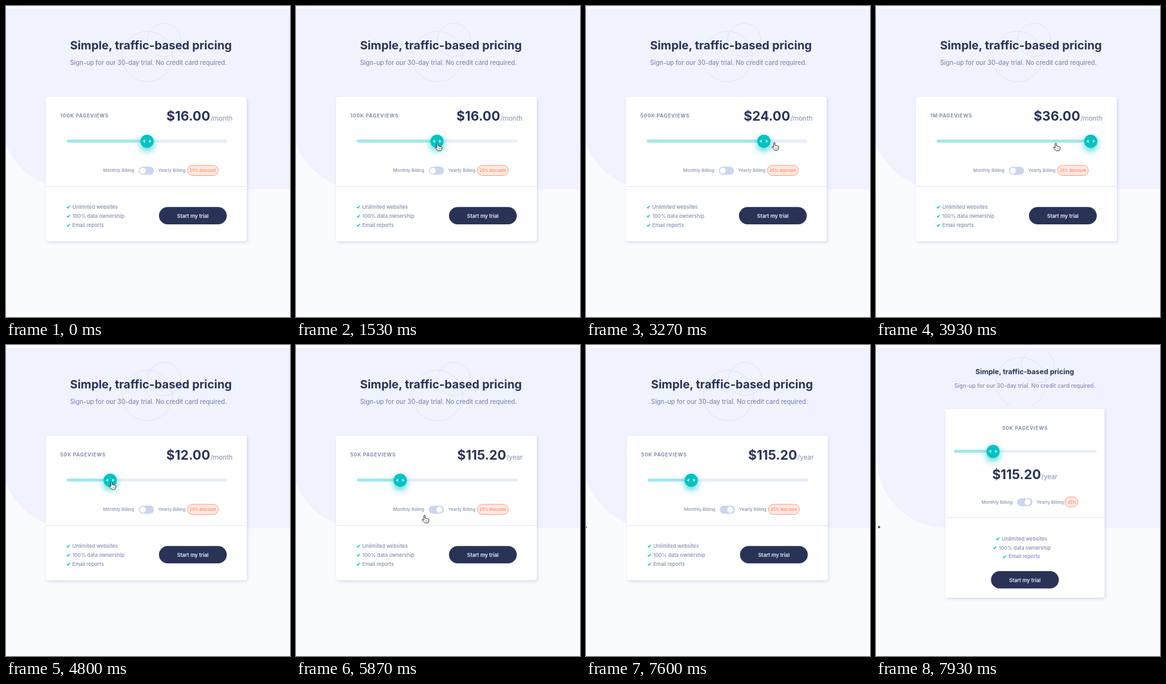
Write an HTML page that moves like this. It is 440 by 480 pixels and loops after 8000 ms.

```html
<!DOCTYPE html>
<html lang="en">
<head>
<meta charset="utf-8">
<title>Pricing slider</title>
<style>
  html, body { margin: 0; width: 100%; height: 100%; overflow: hidden; background: #fafbff; }
  svg { display: block; width: 440px; height: 480px; }
  text { font-family: Inter, sans-serif; }
</style>
</head>
<body>
<svg id="stage" viewBox="0 0 440 480"></svg>
<script>
const LOOP = 8000, FRAME = 1000 / 15;
const NAVY = '#293356', CYAN = '#00c2c3', ORANGE = '#ff8c66';
const TIERS = [['10K', 8], ['50K', 12], ['100K', 16], ['500K', 24], ['1M', 36]];
const FEATURES = ['Unlimited websites', '100% data ownership', 'Email reports'];
const YEARLY_AT = 5600, MOBILE_AT = 7660;

// Slider tier from each time on: [ms, tier]
const TIER_STEPS = [[0, 2], [2730, 3], [3530, 4], [4065, 3], [4260, 2], [4460, 1]];

// Pointer path: [ms, x, y] of the pointer's top left corner
const POINTER = [
  [395, 322, 474], [700, 276, 360], [1200, 216, 227], [1530, 215, 211], [1660, 215, 211],
  [1800, 214, 205], [1930, 215, 211], [2060, 215, 211], [2400, 228, 211], [2670, 250, 211],
  [2870, 276, 211], [3000, 278, 209], [3190, 278, 210], [3600, 328, 211], [3750, 326, 211],
  [3930, 275, 211], [4260, 192, 211], [4530, 158, 210], [4795, 158, 210], [5130, 236, 246],
  [5330, 213, 257], [5660, 213, 257], [5870, 194.5, 262.3], [6130, 90, 274], [6330, 10, 279],
  [6400, 3, 280]
];

const DESKTOP = {
  title: { x: 99.2, y: 67, size: 17.95 }, sub: { x: 99.3, y: 91.3, size: 9.72 },
  circles: [219, 78], clip: [0, 130], card: [62, 140, 311, 223],
  label: { x: 84, y: 172 }, price: { x: 351, y: 177, anchor: 'end' },
  track: [94, 343, 208.5], billing: [150.5, 254], badge: [281, 48, '25% discount'],
  divider: 278.5, features: [[94, 310], [94, 324], [94, 338]], button: [237, 310.3]
};
const MOBILE = {
  title: { x: 230.5, y: 45, size: 10.95, anchor: 'middle' },
  sub: { x: 230.5, y: 66, size: 8.76, anchor: 'middle' },
  circles: [224.5, 58], clip: [11, 83], card: [107.5, 99, 246.5, 291],
  label: { x: 231, y: 131, anchor: 'middle' }, price: { x: 230.5, y: 207, anchor: 'middle' },
  track: [121, 342, 164], billing: [163.5, 242.4], badge: [292.5, 20.5, '-25%'],
  divider: 266.5, features: [[186, 298.7], [181.5, 312.7], [196.5, 326.5]], button: [178.2, 349]
};

const text = (s, { x, y, size, weight = 500, fill = '#848dad', anchor = 'start', gap = 0 }) =>
  `<text x="${x}" y="${y}" font-size="${size}" font-weight="${weight}" text-anchor="${anchor}"
    letter-spacing="${gap}" fill="${fill}">${s}</text>`;
const box = (x, y, w, h, r, fill, more = '') =>
  `<rect x="${x}" y="${y}" width="${w}" height="${h}" rx="${r}" fill="${fill}" ${more}/>`;
const circle = (x, y, r, fill, more = '') =>
  `<circle cx="${x}" cy="${y}" r="${r}" fill="${fill}" ${more}/>`;
const path = (d, fill, more = '') => `<path d="${d}" fill="${fill}" ${more}/>`;

const DEFS = `<defs>
  <filter id="cardShadow" x="-20%" y="-20%" width="140%" height="140%">
    <feDropShadow dx="1.5" dy="2" stdDeviation="2.8" flood-color="#bcc6e6" flood-opacity=".6"/></filter>
  <filter id="glow" x="-100%" y="-100%" width="300%" height="300%">
    <feDropShadow dx="0" dy="4.5" stdDeviation="5.5" flood-color="${CYAN}" flood-opacity=".75"/></filter>
</defs>`;

function backdrop(left) {
  return box(0, 0, 440, 480, 0, '#fafbff') +
    path(`M${left} 4H440V282.7H${left + 109}A109 109 0 0 1 ${left} 173.7Z`, '#f0f3fe');
}

function header(v) {
  const [x, y] = v.circles, ring = 'stroke="#dde2f3" stroke-width=".9"';
  return `<clipPath id="ringClip"><rect y="${v.clip[0]}" width="440" height="${v.clip[1]}"/></clipPath>
    <g clip-path="url(#ringClip)">${circle(x, y, 39, 'none', ring)}${circle(x + 26, y - 25.5, 25.7, 'none', ring)}</g>` +
    text('Simple, traffic-based pricing', { ...v.title, weight: 700, fill: NAVY }) +
    text('Sign-up for our 30-day trial. No credit card required.', v.sub);
}

function slider([x0, x1, y], tier) {
  const x = x0 + 10.3 + tier * (x1 - x0 - 20.6) / 4;
  return box(x0, y - 2.3, x1 - x0, 4.6, 2.3, '#e9ecf9') + box(x0, y - 2.3, x - x0, 4.6, 2.3, '#a0e8ea') +
    circle(x, y + .3, 10.3, CYAN, 'filter="url(#glow)"') +
    path(`M${x - 3} ${y - 2.6}v5.6l-4 -2.8zM${x + 3} ${y - 2.6}v5.6l4 -2.8z`, '#a8f0ef');
}

function billing(v, yearly) {
  const [x, y] = v.billing, [bx, bw, words] = v.badge;
  const style = { y: y + 2.3, size: 6.85 };
  return text('Monthly Billing', { ...style, x }) + text('Yearly Billing', { ...style, x: x + 85.3 }) +
    box(x + 55.3, y - 6, 23.5, 12.4, 6.2, '#ccd5ef') + circle(x + (yearly ? 71.4 : 61.5), y + .2, 4.6, '#fff') +
    box(bx, y - 8, bw, 15.5, 7.7, '#ffe9e2', `stroke="${ORANGE}" stroke-width=".8"`) +
    text(words, { x: bx + bw / 2, y: y + 2.2, size: 6.1, weight: 600, fill: ORANGE, anchor: 'middle' });
}

function features(v) {
  return v.features.map(([x, y], i) =>
    path(`M${x + .5} ${y + .2}l1.6 1.6L${x + 4.8} ${y - 1.6}`, 'none', 'stroke="#10cfc0" stroke-width="1.5"') +
    text(FEATURES[i], { x: x + 8.7, y: y + 2.8, size: 7.8 })).join('');
}

function page(v, tier, yearly) {
  const [cx, cy, cw, ch] = v.card, [bx, by] = v.button, [views, cost] = TIERS[tier];
  const price = (yearly ? cost * 12 * .8 : cost).toFixed(2);
  return header(v) +
    box(cx, cy, cw, ch, 3.5, '#fff', 'filter="url(#cardShadow)"') +
    box(cx, v.divider - .5, cw, 1, 0, '#e3e7f4') +
    text(`${views} PAGEVIEWS`, { ...v.label, size: 7.6, weight: 700, gap: .65 }) +
    text(`<tspan font-size="20.2" font-weight="700" fill="${NAVY}">$${price}</tspan>` +
      `<tspan dx=".6">/${yearly ? 'year' : 'month'}</tspan>`, { ...v.price, size: 10.2, weight: 400 }) +
    slider(v.track, tier) + billing(v, yearly) + features(v) +
    box(bx, by, 105, 26.7, 13.3, NAVY) +
    text('Start my trial', { x: bx + 52.5, y: by + 16.5, size: 7.9, weight: 600, fill: '#eef1ff', anchor: 'middle' });
}

function pointer(t, left) {
  if (t < POINTER[0][0]) return '';
  if (t > 6430) {
    const x = left - 1.5;
    return path(`M${x + 4} 278.6v5l4.2 -2.5zM${x - 1} 278.6v5l-4.2 -2.5z`, '#111', 'stroke="#fff" stroke-width=".6"');
  }
  const next = POINTER.findIndex(p => p[0] > t);
  const b = POINTER.at(next), a = next > 0 ? POINTER[next - 1] : b;
  const k = b === a ? 0 : (t - a[0]) / (b[0] - a[0]);
  const [x, y] = [1, 2].map(i => a[i] + (b[i] - a[i]) * k);
  const arrow = t < 1180 || t > 5950;
  const shape = arrow
    ? path('M.5 .5V9.8L2.7 7.8L4.1 11L5.6 10.4L4.2 7.3H7.2Z', '#111', 'stroke="#fff" stroke-width=".7"')
    : path('M3.3 7.4V1.6a1.05 1.05 0 0 1 2.1 0V5l4.4 .9q1.6 .4 1.4 1.9l-.6 2.9q-.3 1.7 -1.6 1.7H5.6q-.9 0 -1.5 -.8L.8 8.1q-.5 -1 .4 -1.3 .9 -.2 2.1 1.4z',
        '#fff', 'stroke="#222" stroke-width=".9"') +
      path('M6 8.3v2M7.5 8.3v2M9 8.3v2', 'none', 'stroke="#555" stroke-width=".5"');
  return `<g transform="translate(${x} ${y})">${shape}</g>`;
}

function render(t) {
  const drag = Math.max(0, (t - 7400) / 533);
  const left = -7.6 + 8.4 * drag;
  const tier = TIER_STEPS.findLast(s => s[0] <= t)[1];
  const mobile = t >= MOBILE_AT;
  const shift = (mobile ? drag - 1 : drag) * 4.2;
  return DEFS + backdrop(left) +
    `<g transform="translate(${shift} 0)">${page(mobile ? MOBILE : DESKTOP, tier, t >= YEARLY_AT)}</g>` +
    pointer(t, left);
}

const stage = document.getElementById('stage');
let shown = -1;
function tick() {
  const frame = Math.floor((performance.now() % LOOP + 3) / FRAME) % 120;
  if (frame !== shown) stage.innerHTML = render(frame * FRAME);
  shown = frame;
  requestAnimationFrame(tick);
}
tick();
</script>
</body>
</html>
```
